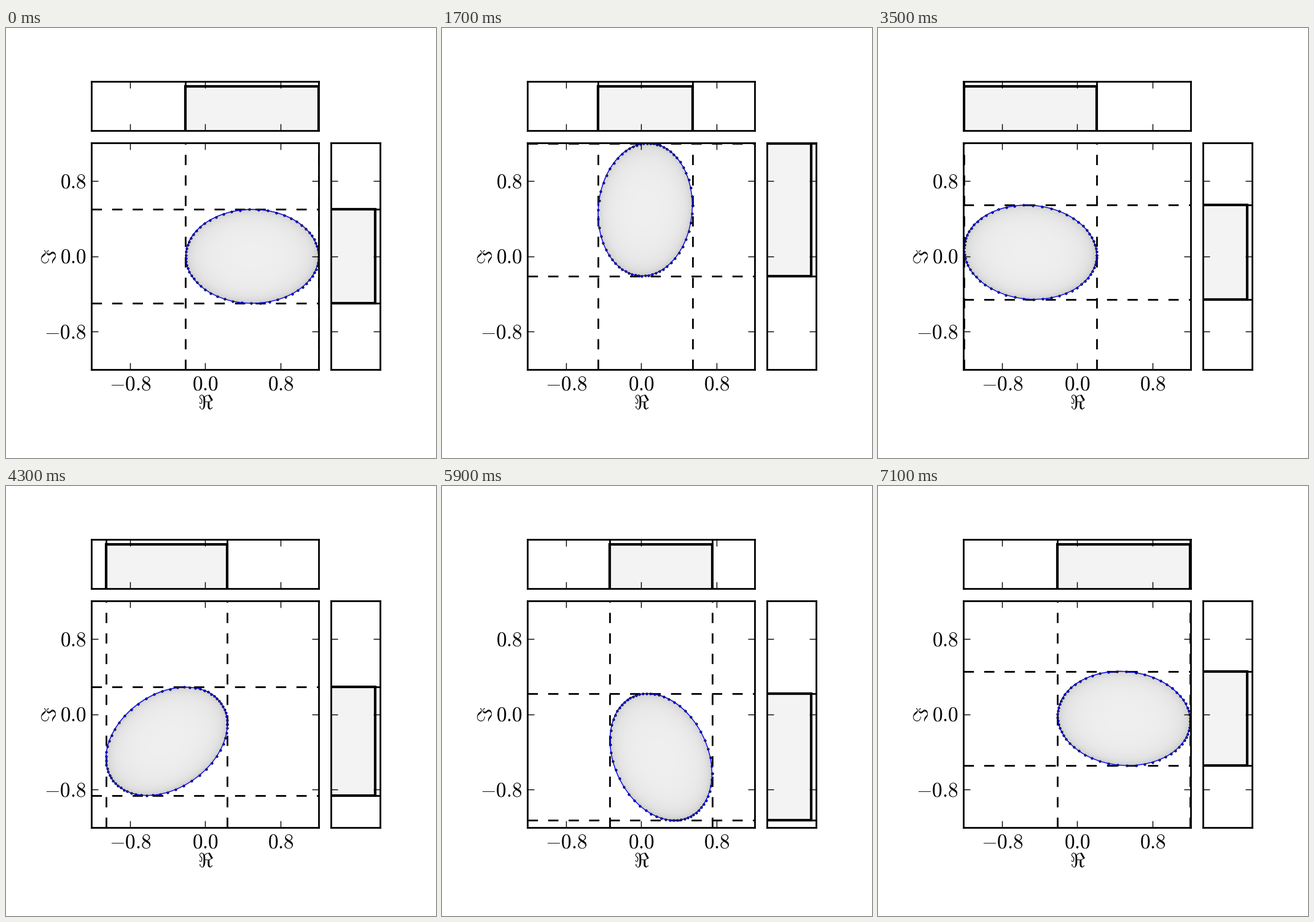
Write a matplotlib script that moves like this. It is 700 by 700 pixels and loops after 7.2 s.

```python
import numpy as np
import matplotlib.pyplot as plt
from matplotlib.animation import FuncAnimation

plt.rcParams.update({
    "mathtext.fontset": "cm",
    "axes.linewidth": 2,
    "axes.axisbelow": False,
    "lines.dashed_pattern": [6, 6],
})

SIZE = 700
FRAMES = 72
A2, B2 = 0.5, 0.25            # squared semi-axes of the elliptical range
LIM = (1 + np.sqrt(2)) / 2
TICKS = (-0.8, 0.0, 0.8)
BAR = 0.9                     # height of the flat marginal density

# panel edges in pixels, y measured from the top
LEFT, RIGHT, TOP, BOTTOM = 139.48, 508.8, 187.1, 556.4
GAP, SIDE = 20, 80

fig = plt.figure(figsize=(7, 7), dpi=100, facecolor="white")


def panel(x0, x1, top, bottom, xlim, ylim, xticks=(), yticks=()):
    ax = fig.add_axes([x0 / SIZE, 1 - bottom / SIZE,
                       (x1 - x0) / SIZE, (bottom - top) / SIZE])
    ax.set(xlim=xlim, ylim=ylim, xticks=xticks, yticks=yticks)
    ax.tick_params(direction="in", length=8, width=1, top=True, right=True,
                   labelbottom=False, labelleft=False)
    return ax


def label(x, y, text, **kw):
    fig.text(x / SIZE, 1 - y / SIZE, f"${text}$", fontsize=24, **kw)


span = (-LIM, LIM)
main = panel(LEFT, RIGHT, TOP, BOTTOM, span, span, TICKS, TICKS)
upper = panel(LEFT, RIGHT, TOP - GAP - SIDE, TOP - GAP, span, (0, 1), xticks=TICKS)
side = panel(RIGHT + GAP, RIGHT + GAP + SIDE, TOP, BOTTOM, (0, 1), span, yticks=TICKS)

scale = (RIGHT - LEFT) / (2 * LIM)
mid_x, mid_y = (LEFT + RIGHT) / 2, (TOP + BOTTOM) / 2
for t in TICKS:
    label(mid_x + t * scale + 0.5, 590, f"{t:.1f}", ha="center", va="baseline")
    label(131, mid_y - t * scale + 11.2, f"{t:.1f}", ha="right", va="baseline")
label(325.3, 620, r"\Re", ha="center", va="baseline")
label(72, 372, r"\Im", ha="center", va="center", rotation=90)

# density cloud
N = 369
axis = (np.arange(N) + 0.5) / N * 2 * LIM - LIM
grid = axis[None, :] + 1j * axis[:, None]
shade = np.zeros((N, N, 4))
cloud = main.imshow(shade, extent=span + span, origin="lower",
                    interpolation="nearest", aspect="auto", zorder=1)

# dashed bounds, marginal densities and boundary curve
dash = dict(color="black", lw=2, ls="--")
x_bounds = [[ax.axvline(0, **dash) for ax in (main, upper)] for _ in range(2)]
y_bounds = [[ax.axhline(0, **dash) for ax in (main, side)] for _ in range(2)]
box = dict(facecolor="#f3f3f3", edgecolor="none", zorder=1)
x_fill, = upper.fill([0], [0], **box)
y_fill, = side.fill([0], [0], **box)
x_bar, = upper.plot([], [], color="black", lw=3, solid_joinstyle="miter")
y_bar, = side.plot([], [], color="black", lw=3, solid_joinstyle="miter")
curve, = main.plot([], [], color="blue", lw=1, marker=".", ms=5,
                   mfc="blue", mec="black", mew=0.5)

normals = np.arange(0, 2 * np.pi, 0.1)


def boundary(phi, turn):
    """Boundary points whose outward normals have the angles phi."""
    c, s = np.cos(phi - turn), np.sin(phi - turn)
    h = np.sqrt(A2 * c**2 + B2 * s**2)
    return (0.5 + (A2 * c + 1j * B2 * s) / h) * np.exp(1j * turn)


def draw(i):
    turn = 2 * np.pi * i / FRAMES

    local = grid * np.exp(-1j * turn) - 0.5
    r2 = local.real**2 / A2 + local.imag**2 / B2
    depth = 0.068 / np.sqrt(np.clip(1 - r2, 0, 1) + 0.06)
    shade[..., 3] = np.where(r2 < 1, 1 - np.exp(-depth), 0)
    cloud.set_data(shade.copy())

    pts = boundary(normals, turn)
    pts = np.append(pts, pts[0])
    curve.set_data(pts.real, pts.imag)

    ends = boundary(np.array([np.pi, 0, 1.5 * np.pi, 0.5 * np.pi]), turn)
    xs, ys = ends[:2].real, ends[2:].imag
    for lines, x in zip(x_bounds, xs):
        for line in lines:
            line.set_xdata([x, x])
    for lines, y in zip(y_bounds, ys):
        for line in lines:
            line.set_ydata([y, y])

    level = np.array([0, BAR, BAR, 0])
    xs, ys = np.repeat(xs, 2), np.repeat(ys, 2)
    x_bar.set_data(xs, level)
    y_bar.set_data(level, ys)
    x_fill.set_xy(np.column_stack([xs, level]))
    y_fill.set_xy(np.column_stack([level, ys]))
    return []


anim = FuncAnimation(fig, draw, frames=FRAMES, interval=100,
                     repeat=True, repeat_delay=0, blit=False)
plt.show()
```
